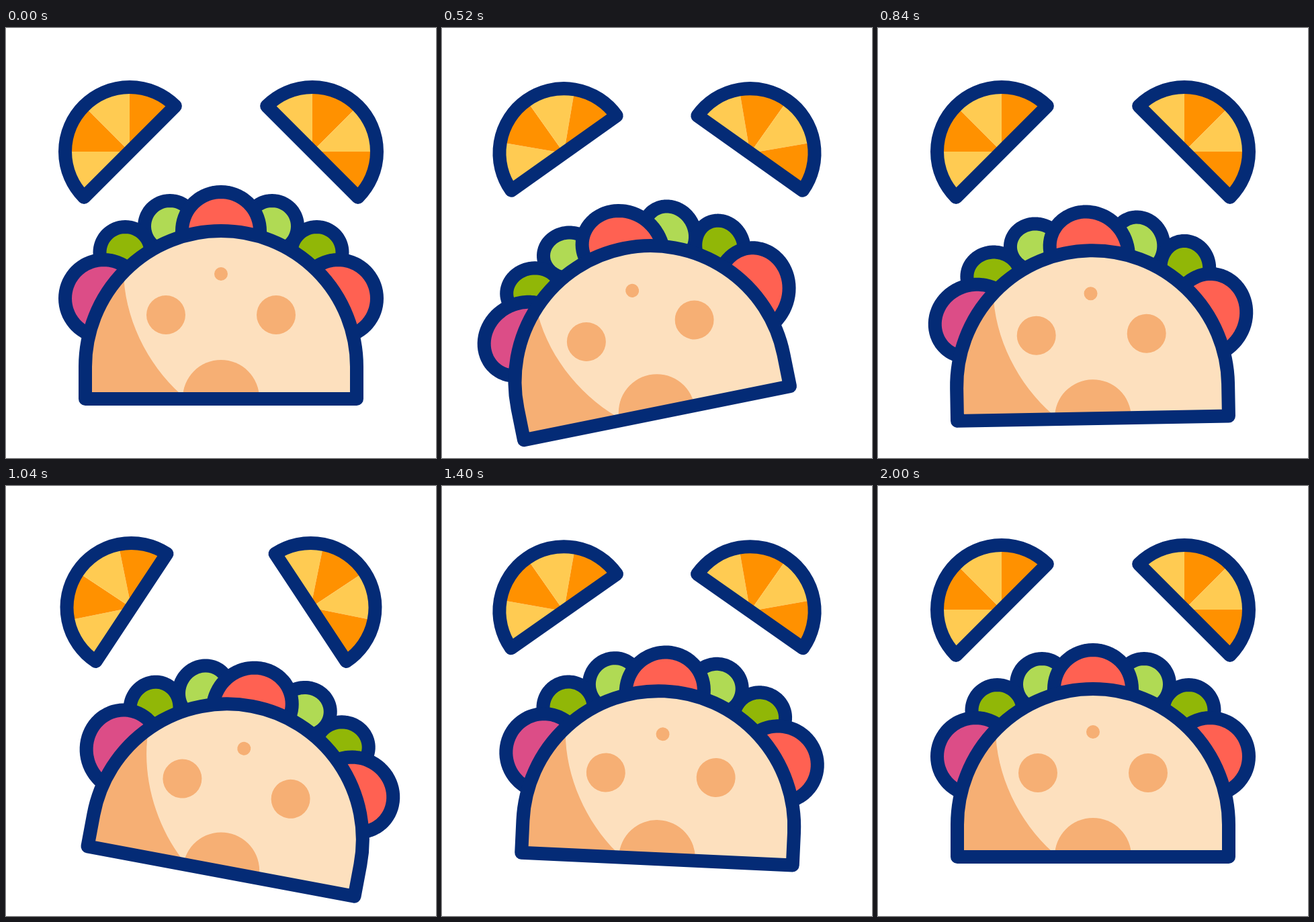
Animation of 640x640 px, one loop 2.12 s. Source, as an HTML page with a canvas:

```html
<!DOCTYPE html>
<html lang="en">
<head>
<meta charset="utf-8">
<title>Taco</title>
<style>
  html, body { margin: 0; width: 100%; height: 100%; overflow: hidden; background: #fff; }
  canvas { display: block; width: 100vmin; height: 100vmin; }
</style>
</head>
<body>
<canvas width="640" height="640"></canvas>
<script>
const ctx = document.querySelector('canvas').getContext('2d');
const LOOP = 2120, STEP = 40, RAD = Math.PI / 180;
const NAVY = '#042b76', ORANGE = '#ff9100', YELLOW = '#ffcb52';
const SHELL = '#fde0be', TOAST = '#f6af74', RED = '#ff6152', PINK = '#dc4d87';
const LIME = '#b0da54', GREEN = '#91b707';

// Keyframes are [time, value] pairs
const drop = [[180, 0], [710, 30], [760, 30], [1560, 0]];
const tilt = [[190, 0], [580, -12.2], [610, -12.2], [1085, 11.2], [1545, 0]];
const sway = [[320, 0], [640, -0.3], [1200, 0.2], [1530, -0.05], [1960, 0]];
const rock = [[320, 0], [600, 12], [1080, -12], [1470, 12], [2000, 0]];

// x, y, radius, colour; back to front
const fillings = [
  [244, 295, 38, LIME], [396, 295, 38, LIME],
  [177.5, 334, 38, GREEN], [462.5, 334, 38, GREEN],
  [145.5, 402.5, 57.5, PINK], [494.5, 402.5, 57.5, RED],
  [320, 302, 58, RED]
];
const spots = [[238, 427, 29], [402, 427, 29], [320, 366, 10], [320, 551, 57]];
const shell = new Path2D('M118 552V504A202 202 0 0 1 522 504V552Z');
const shade = new Path2D('M175 360C175 430 210 500 260 545V560H100V360Z');

function valueAt(keys, t) {
  const i = keys.findIndex(k => k[0] > t);
  if (i < 0) return keys[keys.length - 1][1];
  if (i === 0) return keys[0][1];
  const [t0, a] = keys[i - 1], [t1, b] = keys[i];
  const u = (t - t0) / (t1 - t0);
  return a + (b - a) * u * u * (3 - 2 * u);
}

function disc(x, y, r) {
  ctx.beginPath();
  ctx.arc(x, y, r, 0, 2 * Math.PI);
  ctx.fill();
}

// side: -1 left, 1 right
function drawSlice(side, angle) {
  const r = 96, start = (side < 0 ? 135 : 225) * RAD;
  ctx.save();
  ctx.translate(320 + side * 150, 170);
  ctx.rotate(-side * angle * RAD);
  ctx.translate(-side * 14, 14);
  for (let i = 0; i < 4; i++) {
    const from = start + i * 45 * RAD;
    ctx.beginPath();
    ctx.moveTo(0, 0);
    ctx.arc(0, 0, r, from, from + 45 * RAD);
    ctx.fillStyle = i % 2 ? ORANGE : YELLOW;
    ctx.fill();
  }
  ctx.beginPath();
  ctx.arc(0, 0, r, start, start + Math.PI);
  ctx.closePath();
  ctx.stroke();
  ctx.restore();
}

// A circle whose points swing around a pivot, more the further they are from the shell
function drawFilling([cx, cy, r, colour], lean) {
  const px = 320, py = 425;
  ctx.beginPath();
  for (let i = 0; i < 72; i++) {
    const a = i * 5 * RAD;
    const x = cx + r * Math.cos(a), y = cy + r * Math.sin(a);
    const shift = lean * (Math.hypot(x - 320, y - 504) - 202);
    const d = Math.hypot(x - px, y - py);
    const phi = Math.atan2(y - py, x - px) + shift / d;
    ctx.lineTo(px + d * Math.cos(phi), py + d * Math.sin(phi));
  }
  ctx.closePath();
  ctx.fillStyle = colour;
  ctx.fill();
  ctx.stroke();
}

function drawTaco(t) {
  const lean = valueAt(sway, t);
  ctx.save();
  ctx.translate(320, 552 + valueAt(drop, t));
  ctx.rotate(valueAt(tilt, t) * RAD);
  ctx.translate(-320, -552);
  fillings.forEach(f => drawFilling(f, lean));
  ctx.fillStyle = SHELL;
  ctx.fill(shell);
  ctx.save();
  ctx.clip(shell);
  ctx.fillStyle = TOAST;
  ctx.fill(shade);
  spots.forEach(s => disc(...s));
  ctx.restore();
  ctx.stroke(shell);
  ctx.restore();
}

function frame(now) {
  const t = Math.floor(now % LOOP / STEP) * STEP;
  ctx.fillStyle = '#fff';
  ctx.fillRect(0, 0, 640, 640);
  ctx.strokeStyle = NAVY;
  ctx.lineWidth = 20;
  ctx.lineJoin = 'round';
  const angle = valueAt(rock, t);
  drawSlice(-1, angle);
  drawSlice(1, angle);
  drawTaco(t);
  requestAnimationFrame(frame);
}
requestAnimationFrame(frame);
</script>
</body>
</html>
```
